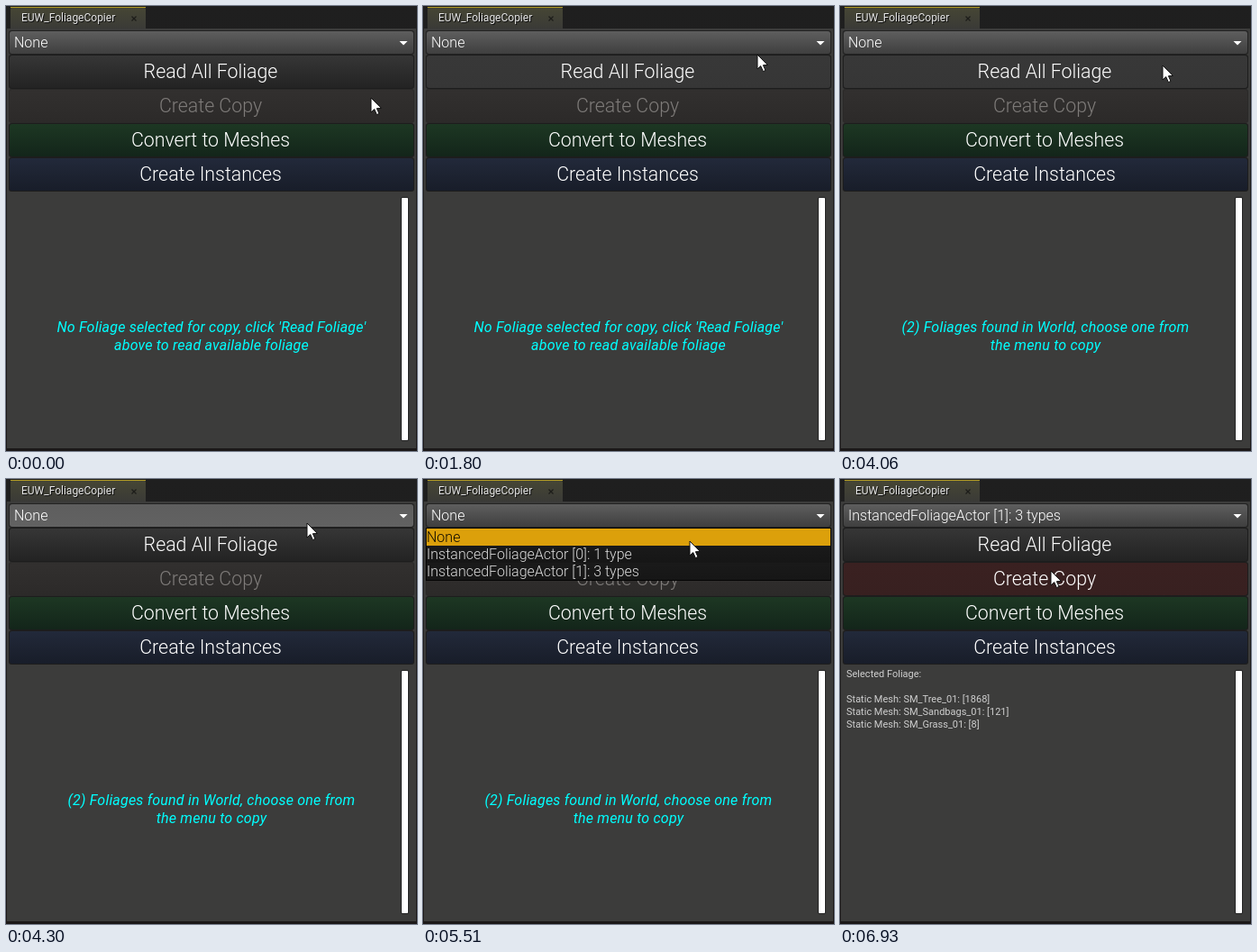
Write an HTML page with a canvas that moves like this. It is 456 by 494 pixels and loops after 8030 ms.

```html
<!DOCTYPE html>
<html>
<head>
<meta charset="utf-8">
<style>
html, body { margin: 0; width: 100%; height: 100%; overflow: hidden; background: #1e1e1e; }
canvas { display: block; }
</style>
</head>
<body>
<canvas id="stage" width="456" height="494"></canvas>
<script>
const ctx = document.getElementById('stage').getContext('2d');
const LOOP = 8030;
const ROWS = ['None', 'InstancedFoliageActor [0]: 1 type', 'InstancedFoliageActor [1]: 3 types'];
const ROW_H = 19;

// Pointer moves: start, end, number of steps, target x, target y
const MOVES = [
  [70, 380, 5, 372, 50],
  [1800, 2210, 6, 366, 71],
  [4060, 4300, 4, 334, 49],
  [4400, 4540, 3, 318, 45],
  [5340, 5510, 3, 296, 69],
  [5580, 5760, 3, 268, 88],
  [5830, 6060, 4, 246, 75],
  [6160, 6390, 4, 235, 102],
  [6690, 6690, 1, 234, 102]
];

function pointerAt(t) {
  let x = 405, y = 102;
  for (const [start, end, steps, tx, ty] of MOVES) {
    if (t < start) break;
    const done = t >= end ? 1 : (Math.floor((t - start) / (end - start) * (steps - 1)) + 1) / steps;
    x += (tx - x) * done;
    y += (ty - y) * done;
  }
  return [Math.round(x), Math.round(y)];
}

function rect(x, y, w, h, top, bottom = top, radius = 0) {
  const fill = ctx.createLinearGradient(0, y, 0, y + h);
  fill.addColorStop(0, top);
  fill.addColorStop(1, bottom);
  ctx.fillStyle = fill;
  ctx.beginPath();
  ctx.roundRect(x, y, w, h, radius);
  ctx.fill();
}

function text(str, x, y, font, color, align = 'left', spacing = 0) {
  ctx.font = font + ' Roboto, sans-serif';
  ctx.letterSpacing = spacing + 'px';
  ctx.textAlign = align;
  ctx.fillStyle = color;
  ctx.fillText(str, x, y);
}

function polygon(points, fill, stroke) {
  ctx.beginPath();
  for (const [x, y] of points) ctx.lineTo(x, y);
  ctx.closePath();
  ctx.fillStyle = fill;
  ctx.fill();
  if (stroke) {
    ctx.strokeStyle = stroke;
    ctx.lineWidth = 1;
    ctx.stroke();
  }
}

function button(label, y, top, bottom, color = '#fff', border = '#1d1d1d') {
  rect(3, y - 1, 450, 38, border, border, 3);
  rect(4, y, 448, 36, top, bottom, 3);
  text(label, 227, y + 25, '300 21.33px', color, 'center');
}

function drawWindow() {
  rect(0, 0, 456, 494, '#1f1f1f', '#1b1818');
  rect(5, 1, 150, 25, '#464634', '#3a3a37', [3, 3, 0, 0]);
  rect(5, 1, 150, 1, '#b39c25');
  rect(1, 25, 454, 466, '#3c3c3b');
  text('EUW_FoliageCopier', 18, 18, '12px', '#111');
  text('EUW_FoliageCopier', 17, 17, '12px', '#e6e6e6');
  ctx.strokeStyle = '#1d1d1a';
  ctx.lineWidth = 1.3;
  ctx.beginPath();
  ctx.moveTo(139.5, 11.5); ctx.lineTo(144.5, 16.5);
  ctx.moveTo(144.5, 11.5); ctx.lineTo(139.5, 16.5);
  ctx.stroke();
  rect(438, 212, 9, 271, '#232323', '#232323', 2);
  rect(439, 213, 7, 269, '#fff', '#fff', 1);
}

function drawCombo(label, hover, pressed) {
  rect(3, 27, 450, 27, '#222', '#222', 3);
  rect(4, 28, 448, 25, pressed ? '#484848' : '#5e5e5e', pressed ? '#4c4c4c' : hover ? '#626262' : '#3f3f3f', 3);
  text(label, 9, 46, '300 16px', '#fff');
  polygon([[436.5, 39], [445.5, 39], [441, 43.5]], '#fff');
}

function drawMenu(count, y) {
  rect(3, 54, 450, count * ROW_H + 2, '#050505');
  for (let i = 0; i < count; i++) {
    const top = 55 + i * ROW_H;
    const hover = y >= top && y < top + ROW_H;
    if (i === 0) rect(4, top, 448, ROW_H, '#dca00b');
    else rect(4, top, 448, ROW_H, hover ? '#2d2d2d' : '#1a1a1a', hover ? '#262626' : '#161616');
    text(ROWS[i], 4, top + 15, '300 16px', i ? '#dadada' : '#140e00');
  }
}

function drawMessage(t) {
  if (t >= 6860) {
    ['Selected Foliage:', '', 'Static Mesh: SM_Tree_01: [1868]', 'Static Mesh: SM_Sandbags_01: [121]',
      'Static Mesh: SM_Grass_01: [8]'].forEach((line, i) => text(line, 7, 220 + i * 14, '11px', '#cfcfcf'));
    return;
  }
  const lines = t < 2500
    ? ["No Foliage selected for copy, click 'Read Foliage'", 'above to read available foliage']
    : ['(2) Foliages found in World, choose one from', 'the menu to copy'];
  lines.forEach((line, i) => text(line, 228, 362 + i * 20, 'italic 16px', '#00ffff', 'center', 0.2));
}

function drawPointer(x, y) {
  const shape = [[0, 0], [0, 16], [3.7, 12.6], [6.4, 18.6], [9, 17.5], [6.4, 11.7], [11.4, 11.5]];
  polygon(shape.map(([px, py]) => [x + px, y + py]), '#fff', '#111');
}

function draw(t) {
  const within = (a, b) => t >= a && t < b;
  const [x, y] = pointerAt(t);
  const selected = t >= 6860;
  const menuRows = within(700, 1330) ? 1 : within(4710, 6860) ? 3 : 0;
  const over = top => !menuRows && y >= top && y < top + 38;

  drawWindow();
  drawCombo(selected ? ROWS[2] : ROWS[0], y >= 28 && y < 54, within(640, 700) || within(4640, 4710));

  if (within(2370, 2430)) button('Read All Foliage', 55, '#222', '#262626');
  else if (over(54)) button('Read All Foliage', 55, '#383838', '#363636');
  else button('Read All Foliage', 55, '#363636', '#232323');

  if (!selected) button('Create Copy', 93, '#32302f', '#2c2a29', '#7e7b79', '#2a2928');
  else button('Create Copy', 93, '#3a2121', t >= 6930 ? '#382020' : '#261616');

  button('Convert to Meshes', 131, '#1d3723', '#13251a');
  button('Create Instances', 169, '#22293a', '#181d29');
  drawMessage(t);
  if (menuRows) drawMenu(menuRows, y);
  drawPointer(x, y);
}

function tick() {
  draw(performance.now() % LOOP);
  requestAnimationFrame(tick);
}
tick();
</script>
</body>
</html>
```
